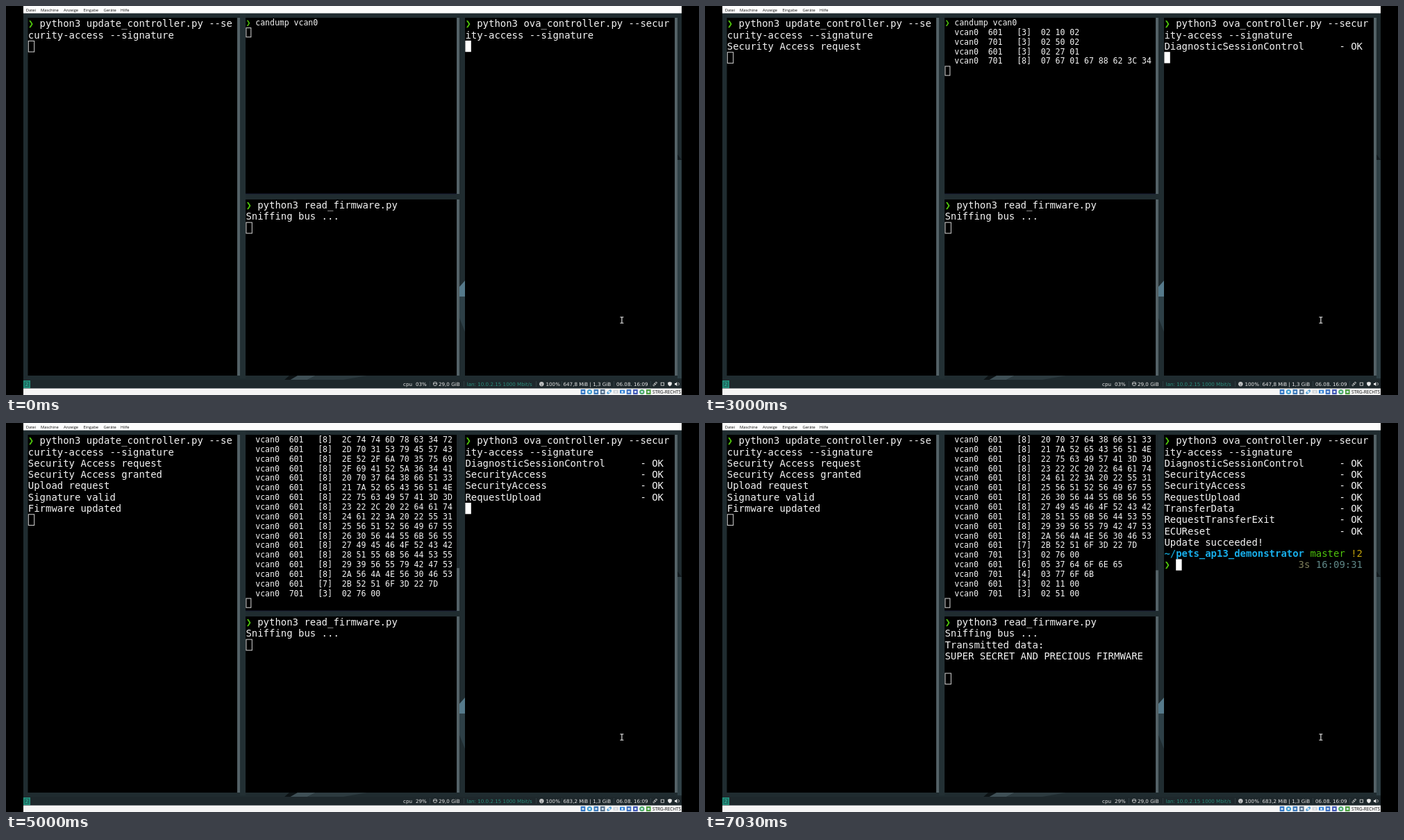
An HTML page with a canvas for the animation above (7060 ms loop, 998 by 561 pixels).

```html
<!DOCTYPE html>
<html lang="de">
<head>
<meta charset="utf-8">
<title>Terminal session</title>
<style>
html, body { margin: 0; width: 100%; height: 100%; overflow: hidden; background: #000; }
canvas { display: block; width: 998px; height: 561px; }
</style>
</head>
<body>
<canvas id="stage"></canvas>
<script>
const W = 998, H = 561, LOOP = 7060;
const canvas = document.getElementById('stage');
const dpr = window.devicePixelRatio || 1;
canvas.width = Math.round(W * dpr);
canvas.height = Math.round(H * dpr);
const ctx = canvas.getContext('2d');
ctx.scale(dpr, dpr);

const MONO = '"DejaVu Sans Mono", "DejaVu Sans", monospace';
const SANS = '"DejaVu Sans", sans-serif';
const MENU = '"Open Sans", sans-serif';
const WHITE = '#f4f4f4', GREEN = '#4fc50c', BAR = '#536166';

const BIG = { size: 13.95, cw: 8.4, lh: 16.27, base: 12.95 };
const SMALL = { size: 11.5, cw: 6.92, lh: 13.84, base: 10.9 };

function rect(x, y, w, h, color) {
  ctx.fillStyle = color;
  ctx.fillRect(x, y, w, h);
}

function poly(color, ...pts) {
  ctx.fillStyle = color;
  ctx.beginPath();
  pts.forEach(([x, y]) => ctx.lineTo(x, y));
  ctx.fill();
}

function label(s, x, y, size, family, color) {
  ctx.font = size + 'px ' + family;
  ctx.fillStyle = color;
  ctx.fillText(s, x, y);
}

// Terminal text sits on a fixed character grid.
function cells(s, pane, col, row, color = WHITE, bold = false) {
  const f = pane.font;
  ctx.font = (bold ? 'bold ' : '') + f.size + 'px ' + MONO;
  ctx.fillStyle = color;
  const y = pane.y + row * f.lh + f.base;
  [...s].forEach((ch, i) => {
    if (ch !== ' ') ctx.fillText(ch, pane.x + (col + i) * f.cw, y);
  });
}

function cursor(pane, col, row, solid) {
  const f = pane.font;
  const x = pane.x + col * f.cw, y = pane.y + row * f.lh;
  if (solid) return rect(x, y, f.cw, f.lh, '#fff');
  ctx.strokeStyle = '#d8d8d8';
  ctx.lineWidth = 1;
  ctx.strokeRect(x + 0.5, y + 0.5, f.cw, f.lh - 0.6);
}

const left = { x: 31.8, y: 17.4, font: BIG };
const dump = { x: 345.4, y: 17.2, font: SMALL };
const sniff = { x: 345.4, y: 279.1, font: BIG };
const right = { x: 661.4, y: 17.4, font: BIG };

// --- CAN traffic ---------------------------------------------------------
const hex = n => n.toString(16).toUpperCase().padStart(2, '0');
const frame = (id, bytes) =>
  `  vcan0  ${id}   [${bytes.length}]  ${bytes.map(hex).join(' ')}`;
const parse = s => s.split(' ').map(v => parseInt(v, 16));

const traffic = [];
const send = (t, id, bytes) => traffic.push({ t, s: frame(id, parse(bytes)) });

function sendFirmware(t) {
  const secret = btoa('SUPER SECRET AND PRECIOUS FIRMWARE\n');
  const head = '{"signature": "';
  const tail = 'wgR3y7nttmxc4rp1SyEWCR/jp5uiiARZ64Ap7d8fQ3zReCVQNucIWA==' +
    `", "data": "${secret}"}`;
  const abc = 'ABCDEFGHIJKLMNOPQRSTUVWXYZabcdefghijklmnopqrstuvwxyz0123456789+/';
  let seed = 77, mid = '';
  while (head.length + mid.length + tail.length < 417) {
    seed = (seed * 16807) % 2147483647;
    mid += abc[seed % 64];
  }
  const data = [0x36, ...[...head + mid + tail].map(c => c.charCodeAt(0))];
  traffic.push({ t, s: frame('601', [0x11, 0xA2, ...data.slice(0, 6)]) });
  send(t + 10, '701', '30 00 00');
  for (let i = 6, n = 1; i < data.length; i += 7, n++) {
    const part = [0x20 + n % 16, ...data.slice(i, i + 7)];
    traffic.push({ t: t + 20 + n * 9.5, s: frame('601', part) });
  }
}

send(2430, '601', '02 10 02');
send(2430, '701', '02 50 02');
send(2800, '601', '02 27 01');
send(2800, '701', '07 67 01 67 88 62 3C 34');
send(3200, '601', '07 27 02 6A 62 B9 D2 C4');
send(3200, '701', '02 67 02');
send(3600, '601', '10 08 35 00 14 AA AA AA');
send(3600, '701', '30 00 00');
send(3600, '601', '21 AA 64');
send(3600, '701', '02 75 00');
sendFirmware(3970);
send(4670, '701', '02 76 00');
send(5080, '601', '05 37 64 6F 6E 65');
send(5080, '701', '03 77 6F 6B');
send(5600, '601', '02 11 00');
send(5600, '701', '02 51 00');

// --- Program output ------------------------------------------------------
const updates = [
  [2800, 'Security Access request'],
  [3200, 'Security Access granted'],
  [3600, 'Upload request'],
  [4600, 'Signature valid'],
  [4670, 'Firmware updated']
];
const steps = [
  [2800, 'DiagnosticSessionControl'],
  [3200, 'SecurityAccess'],
  [3600, 'SecurityAccess'],
  [3970, 'RequestUpload'],
  [5080, 'TransferData'],
  [5600, 'RequestTransferExit'],
  [6140, 'ECUReset']
];
const DONE = 6160;
const past = (list, t) => list.filter(e => e[0] <= t);

function command(pane, s, rest) {
  cells('❯', pane, 0, 0, GREEN);
  cells(s, pane, 2, 0);
  if (rest) cells(rest, pane, 0, 1);
}

function drawLeft(t) {
  command(left, 'python3 update_controller.py --se', 'curity-access --signature');
  const out = past(updates, t);
  out.forEach(([, s], i) => cells(s, left, 0, 2 + i));
  const midLine = t >= 4600 && t < 4670;
  if (midLine) cursor(left, 15, 1 + out.length);
  else cursor(left, 0, 2 + out.length);
}

function drawDump(t) {
  const lines = traffic.filter(e => e.t <= t);
  const total = lines.length + 2;
  const skip = Math.max(0, total - 18);
  if (!skip) command(dump, 'candump vcan0');
  lines.forEach((e, i) => {
    if (i + 1 >= skip) cells(e.s, dump, 0, i + 1 - skip);
  });
  cursor(dump, 0, total - 1 - skip);
  const thumb = 254 * Math.min(1, 18 / total);
  rect(649, 17, 4, 254, '#20292d');
  rect(649, 271 - thumb, 4, thumb, BAR);
}

function drawSniff(t) {
  command(sniff, 'python3 read_firmware.py', 'Sniffing bus ...');
  if (t < 5080) return cursor(sniff, 0, 2);
  cells('Transmitted data:', sniff, 0, 2);
  cells('SUPER SECRET AND PRECIOUS FIRMWARE', sniff, 0, 3);
  cursor(sniff, 0, 5);
}

function drawRight(t) {
  command(right, 'python3 ova_controller.py --secur', 'ity-access --signature');
  const out = past(steps, t);
  out.forEach(([, s], i) => cells(s.padEnd(30) + '- OK', right, 0, 2 + i));
  if (t < DONE) return cursor(right, 0, 2 + out.length, true);
  cells('Update succeeded!', right, 0, 9);
  cells('~/', right, 0, 10, '#129cc8', true);
  cells('pets_ap13_demonstrator', right, 2, 10, '#17aeea', true);
  cells('master', right, 25, 10, GREEN);
  cells('!2', right, 32, 10, '#c3a30a');
  cells('❯', right, 0, 11, GREEN);
  cells('3s', right, 23, 11, '#80805c');
  cells('16:09:31', right, 26, 11, '#5f8787');
  cursor(right, 2, 11, true);
}

// --- Desktop -------------------------------------------------------------
function drawDesktop() {
  rect(0, 0, W, H, '#000');
  rect(25, 0, 948, 561, '#202c30');
  rect(337, 11, 8, 526, '#233034');
  rect(967, 222, 6, 315, '#304147');
  poly('#141c20', [967, 214], [973, 222], [967, 222]);
  poly('#55798a', [661, 396], [653, 405], [653, 419], [661, 419]);
  poly('#2d3f46', [653, 419], [661, 419], [661, 470], [653, 450]);
  poly('#0d1315', [400, 540], [408, 533], [420, 533], [408, 540]);
  poly('#3f5056', [408, 540], [420, 533], [446, 533], [432, 540]);
  poly('#2d3b40', [446, 533], [520, 533], [480, 540], [432, 540]);

  rect(31.5, 17, 301.5, 516, '#000');
  rect(345, 17, 304, 254, '#000');
  rect(345, 279, 304, 254, '#000');
  rect(661, 17, 302, 516, '#000');
  rect(345, 270.5, 304, 1, '#1b2138');
  rect(333, 17, 4, 516, BAR);
  rect(649, 279, 4, 254, BAR);
  rect(963, 17, 4, 516, BAR);

  rect(25, 0, 948, 10.5, '#fcfcfc');
  const menu = { Datei: 28.7, Maschine: 50, Anzeige: 83, Eingabe: 111.5, 'Geräte': 140.5, Hilfe: 165 };
  for (const name in menu) label(name, menu[name], 7.6, 5.8, MENU, '#111');
}

function drawStatus(t) {
  const busy = t >= 3400;
  const text = (s, x, color = '#e6e6e6') => label(s, x, 547.8, 7.15, SANS, color);
  rect(25, 539, 948, 13, '#1e282c');
  rect(25, 540, 10, 11, '#239680');
  rect(26.5, 541.5, 7, 8, '#1c6a60');
  label('2', 27.7, 548, 7, SANS, '#39c3a6');

  text('cpu', 572);
  text(busy ? '29%' : '03%', 590);
  text('29,0 GiB', 623);
  text('lan: 10.0.2.15 1000 Mbit/s', 663.7, '#2a8d7c');
  text('100%', 777.5);
  text((busy ? '683,2' : '647,8') + ' MiB | 1,3 GiB', 802.5);
  text('06.08. 16:09', 879);
  [610, 659, 763, 800, 875, 928].forEach(x => rect(x, 541, 0.7, 8, '#39474c'));

  ctx.strokeStyle = ctx.fillStyle = '#dcdcdc';
  ctx.lineWidth = 0.8;
  ctx.beginPath();
  ctx.ellipse(618, 543.6, 2.5, 1.2, 0, 0, 7);
  ctx.moveTo(615.5, 543.6);
  ctx.lineTo(615.5, 546.4);
  ctx.bezierCurveTo(616, 548, 620, 548, 620.5, 546.4);
  ctx.lineTo(620.5, 543.6);
  ctx.stroke();
  ctx.beginPath();
  ctx.arc(771.3, 545.2, 3.1, 0, 7);
  ctx.fill();
  rect(769.8, 543.6, 1, 1, '#1e282c');
  rect(771.8, 543.6, 1, 1, '#1e282c');
  rect(769.8, 546, 3, 0.8, '#1e282c');

  ctx.beginPath();
  ctx.ellipse(933.5, 546.3, 1.9, 1.1, -0.8, 0, 7);
  ctx.moveTo(937.5, 543.6);
  ctx.ellipse(935.7, 544, 1.9, 1.1, -0.8, 0, 7);
  ctx.stroke();
  ctx.strokeRect(943.2, 543.2, 4.4, 4);
  poly('#e6e6e6', [956, 542], [959, 543], [958.5, 546.5], [956, 548.6], [953.5, 546.5], [953, 543]);
  poly('#e6e6e6', [963, 544], [964.5, 544], [966.5, 542.2], [966.5, 548.2], [964.5, 546.4], [963, 546.4]);
  ctx.beginPath();
  ctx.arc(966.5, 545.2, 2.8, -0.9, 0.9);
  ctx.stroke();
}

function drawHostBar() {
  rect(25, 551.5, 948, 9.5, '#f5f5f5');
  const tones = ['#2f74c4', '#3d9bd0', '#3976b8', '#55708c', '#4a9cd4', '#cfd3d8',
    '#2b7fd6', '#3b6fc0', '#3f55b4', '#42a860', '#4b9f3c'];
  tones.forEach((tone, i) => {
    const x = 831 + i * 9.43, y = 556.5;
    ctx.fillStyle = tone;
    ctx.beginPath();
    if (i === 1 || i === 9) ctx.arc(x, y, 3.6, 0, 7);
    else if (i === 4) ctx.ellipse(x, y, 4, 2, -0.7, 0, 7);
    else if (i === 5 || i === 6) ctx.rect(x - 3.6, y - 2.8, 7.2, 5);
    else ctx.rect(x - 3.3, y - 3.6, 6.6, 7.2);
    ctx.fill();
    rect(x - 1.5, y - 1.4, 3, 2.8, i === 5 ? '#e9ebee' : '#d4e6f5');
  });
  label('STRG-RECHTS', 931, 558.9, 6.4, MENU, '#111');
}

function drawPointer() {
  rect(886.3, 449, 1.2, 8, '#e0e0e0');
  rect(884.4, 448.2, 5, 1.1, '#e0e0e0');
  rect(884.4, 456.7, 5, 1.1, '#e0e0e0');
}

function draw(t) {
  drawDesktop();
  drawLeft(t);
  drawDump(t);
  drawSniff(t);
  drawRight(t);
  drawStatus(t);
  drawHostBar();
  drawPointer();
}

const start = performance.now();
function tick() {
  draw((performance.now() - start) % LOOP);
  requestAnimationFrame(tick);
}
tick();
</script>
</body>
</html>
```
